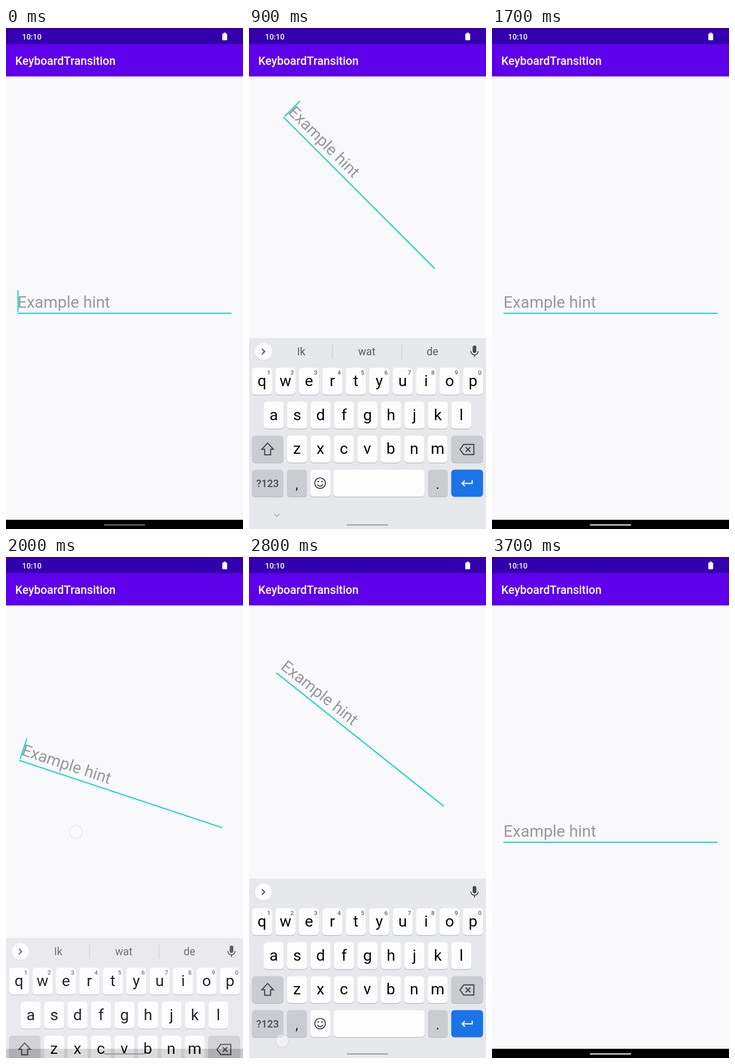
Write an HTML page with a canvas that moves like this. It is 515 px wide and 1087 px high and loops after 3.8 s.

```html
<!DOCTYPE html>
<html lang="en">
<head>
<meta charset="utf-8">
<title>Keyboard transition</title>
<style>
html, body { margin: 0; width: 100%; height: 100%; overflow: hidden; }
canvas { display: block; }
</style>
</head>
<body>
<canvas id="stage" width="515" height="1087"></canvas>
<script>
const W = 515, H = 1087, LOOP = 3800, STEP = 100;
const NAV_TOP = 1067, KB_TOP = 673, KB_HEIGHT = H - KB_TOP;
const TEAL = '#08d9c3', ICON = '#484a4f';
const ctx = document.getElementById('stage').getContext('2d');

// Taps that open and close the keyboard in turn
const moves = [
  { start: 359, time: 275, x: 159, y: 596, opens: true },
  { start: 1162, time: 340, x: 72, y: 1050, opens: false },
  { start: 1888, time: 275, x: 152, y: 597, opens: true },
  { start: 2751, time: 340, x: 72, y: 1050, opens: false }
];

const clamp = v => Math.max(0, Math.min(1, v));

// cubic-bezier(.4, 0, .2, 1)
function ease(x) {
  let lo = 0, hi = 1, s;
  for (let i = 0; i < 24; i++) {
    s = (lo + hi) / 2;
    const bx = 1.2 * s * (1 - s) ** 2 + 0.6 * s * s * (1 - s) + s ** 3;
    if (bx < x) lo = s; else hi = s;
  }
  return s * s * (3 - 2 * s);
}

function rect(c, x, y, w, h, color, r = 0) {
  c.fillStyle = color;
  c.beginPath();
  c.roundRect(x, y, w, h, r);
  c.fill();
}

function text(c, str, x, y, size, color, align = 'center', weight = 400) {
  c.font = `${weight} ${size}px Roboto, sans-serif`;
  c.textAlign = align;
  c.fillStyle = color;
  c.fillText(str, x, y);
}

function stroke(c, d, color, width = 2.5) {
  c.strokeStyle = color;
  c.lineWidth = width;
  c.stroke(new Path2D(d));
}

function disc(c, x, y, r, color) {
  c.fillStyle = color;
  c.beginPath();
  c.arc(x, y, r, 0, 7);
  c.fill();
}

function key(c, x, y, w, color = '#fdfdfe') {
  rect(c, x, y + 1.5, w, 58.5, '#b9bbc0', 7);
  rect(c, x, y, w, 58.5, color, 7);
}

function drawIcons(c) {
  stroke(c, 'M40.5 900.5L53 914H47V926H34V914H28Z', ICON);
  stroke(c, 'M458.5 914.5L466.5 903.5H488.5V925.5H466.5ZM471 909.5L481 919.5M481 909.5L471 919.5', ICON);
  stroke(c, 'M166 987.5A11.5 11.5 0 1 1 143 987.5A11.5 11.5 0 1 1 166 987.5M148.5 990.5Q154.5 998 160.5 990.5', ICON, 2.2);
  disc(c, 150.5, 984, 1.8, ICON);
  disc(c, 158.5, 984, 1.8, ICON);
  stroke(c, 'M485 981V988H463M469 982L463 988L469 994', '#fff');
}

function drawStrip(c, suggestions) {
  disc(c, 31.5, 703, 18.5, '#d3d5d9');
  disc(c, 31.5, 702, 18.5, '#fdfdfe');
  stroke(c, 'M28 696L34 702L28 708', '#55585c');
  rect(c, 486, 689, 8, 16, ICON, 4);
  stroke(c, 'M482 701A8 8 0 0 0 498 701M490 709V714', ICON, 2.2);
  if (!suggestions) return;
  ['Ik', 'wat', 'de'].forEach((word, i) => text(c, word, 113.5 + i * 142.5, 710, 23, '#585b5f'));
  for (const x of [180.5, 331.5]) rect(c, x, 687, 1.2, 30, '#c4c6ca');
}

function makeKeyboard(suggestions) {
  const canvas = document.createElement('canvas');
  canvas.width = W;
  canvas.height = KB_HEIGHT;
  const c = canvas.getContext('2d');
  const pitch = 50.95, keyW = 43.5, gray = '#cbccd1';
  c.translate(0, -KB_TOP);
  rect(c, 0, KB_TOP, W, KB_HEIGHT, '#e7e8ec');
  drawStrip(c, suggestions);

  [['qwertyuiop', 6.5], ['asdfghjkl', 32], ['zxcvbnm', 82.5]].forEach(([letters, left], row) => {
    const top = 737 + row * 73.7;
    [...letters].forEach((letter, i) => {
      const x = left + i * pitch;
      key(c, x, top, keyW);
      text(c, letter, x + keyW / 2, top + 40, 34, '#050506');
      if (!row) text(c, (i + 1) % 10, x + 36.5, 752, 13.5, '#63666a', 'center', 500);
    });
  });

  key(c, 6.5, 884.4, 68.5, gray);
  key(c, 439.5, 884.4, 69, gray);
  const last = 958.3;
  key(c, 6.5, last, 68.5, gray);
  key(c, 82.5, last, keyW, gray);
  key(c, 133.3, last, keyW);
  key(c, 184, last, 197.5);
  key(c, 389, last, 43, gray);
  key(c, 439.5, last, 69, '#1b73e8');
  text(c, '?123', 40.5, 996, 22.5, ICON, 'center', 500);
  text(c, ',', 104, 1000, 30, '#18191b');
  text(c, '.', 410, 1000, 30, '#18191b');
  drawIcons(c);
  return canvas;
}

const keyboards = { full: makeKeyboard(true), bare: makeKeyboard(false) };

function drawBars() {
  rect(ctx, 0, 0, W, H, '#f9f8fb');
  rect(ctx, 0, 105, W, 1, '#e3dcf0');
  rect(ctx, 0, 106, W, 2, '#f4f2f7');
  rect(ctx, 0, 35, W, 70, '#5f00ea');
  rect(ctx, 0, 0, W, 35, '#3400ae');
  text(ctx, '10:10', 35, 25, 16.6, '#fff', 'left', 500);
  rect(ctx, 470, 12, 10.5, 14.5, '#fff', 1.5);
  rect(ctx, 473, 10, 4.5, 3, '#fff');
  text(ctx, 'KeyboardTransition', 20, 80, 25.05, '#fff', 'left', 500);
  rect(ctx, 0, NAV_TOP, W, H - NAV_TOP, '#000');
}

function drawField(open, cursor) {
  ctx.save();
  ctx.translate(257.5, 593 - 254 * open);
  ctx.rotate(open * Math.PI / 4);
  text(ctx, 'Example hint', -232.5, 13.5, 35.07, '#99989b', 'left');
  rect(ctx, -232.5, 24.8, 465, 2.5, TEAL);
  if (cursor) rect(ctx, -232.7, -24, 2.5, 47, TEAL);
  ctx.restore();
}

function drawKeyboard(open, raised, opens) {
  const top = KB_TOP + KB_HEIGHT * (1 - raised);
  ctx.globalAlpha = clamp(opens ? 0.62 + 0.6 * open : 0.3 + 0.95 * open);
  ctx.drawImage(opens ? keyboards.full : keyboards.bare, 0, top);
  ctx.globalAlpha = 1;
  if (opens && (open < 0.3 || open === 1)) stroke(ctx, 'M54.5 1054.5L60 1060L65.5 1054.5', '#b9bbc0');
}

function drawTouch(t) {
  for (const { start, x, y } of moves) {
    const age = t - start;
    if (age < -150 || age > 250) continue;
    ctx.globalAlpha = clamp(1 - age / 250);
    disc(ctx, x, y, 14, 'rgba(252,252,255,.6)');
    ctx.strokeStyle = '#d3d5e8';
    ctx.lineWidth = 1.6;
    ctx.stroke();
    ctx.globalAlpha = 1;
  }
}

function draw(t) {
  let open = 0, raised = 0, opens = false;
  for (const m of moves) {
    if (t < m.start) break;
    const p = clamp((t - m.start) / m.time), e = p === 1 ? 1 : ease(p);
    opens = m.opens;
    open = opens ? p : 1 - p;
    raised = opens ? e : 1 - e;
  }
  drawBars();
  drawField(open, (t + 150) % 1000 < 500);
  if (open > 0) drawKeyboard(open, raised, opens);
  const handle = open > 0 ? (opens && open < 0.3 ? '#cfcfcf' : '#a1a1a4') : t < 400 ? '#6e6e6e' : '#e2e2e2';
  rect(ctx, 212.5, 1076.7, 90, 2.8, handle, 1.4);
  drawTouch(t);
}

function tick() {
  const t = performance.now() % LOOP;
  draw(Math.floor(t / STEP) * STEP);
  requestAnimationFrame(tick);
}
tick();
</script>
</body>
</html>
```
